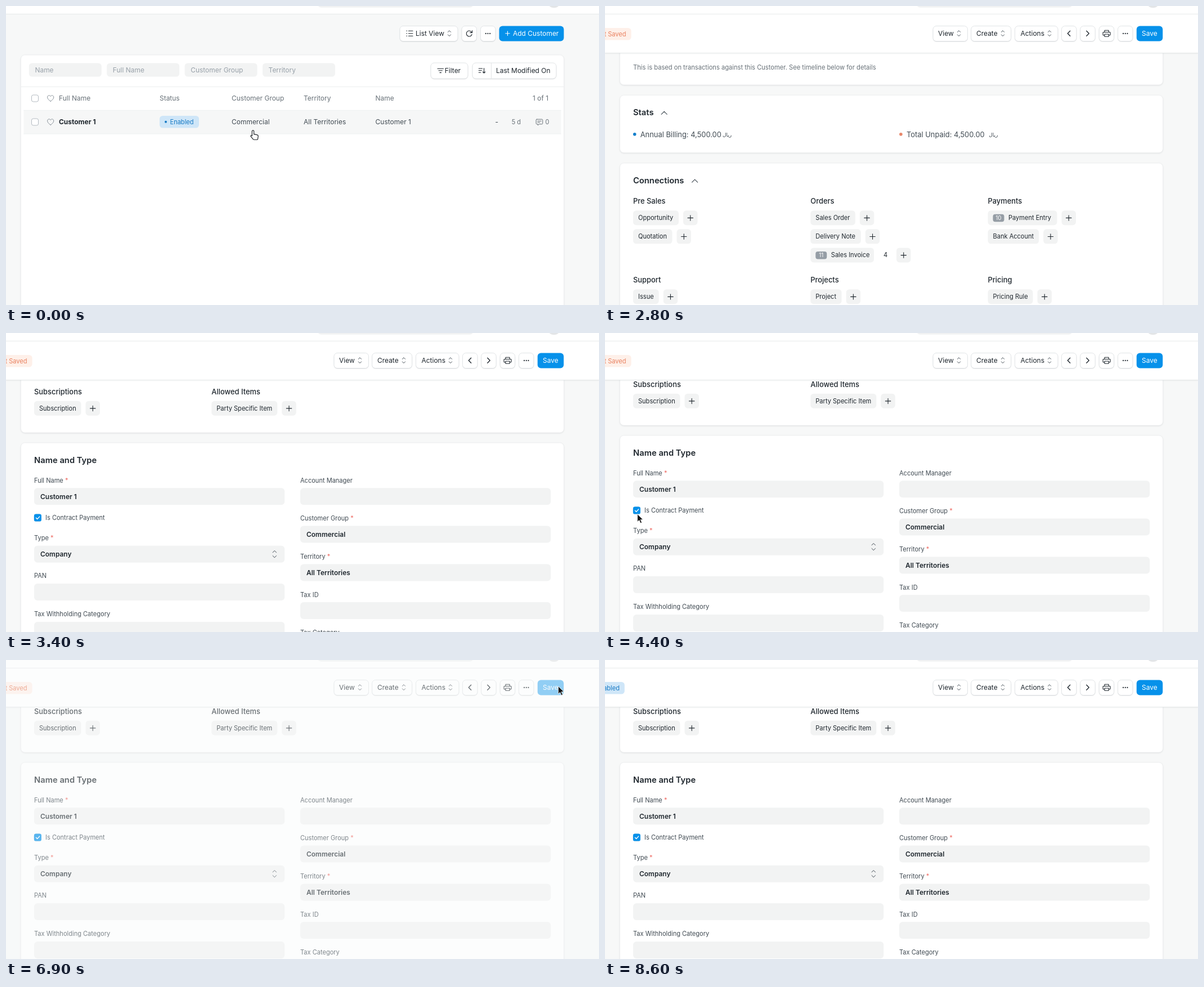
Animation of 1054x531 px, one loop 9100 ms. Source, as an HTML page:

```html
<!DOCTYPE html>
<html lang="en">
<head>
<meta charset="utf-8">
<title>Customer form</title>
<style>
html, body { margin: 0; width: 100%; height: 100%; overflow: hidden; background: #f7f8f8; }
svg { display: block; width: 1054px; height: 531px; }
text { font-family: Inter, sans-serif; white-space: pre; }
.chart text { font-family: "Open Sans", "Noto Sans", sans-serif; }
.rial { font-family: "DejaVu Sans", sans-serif; }
.card { filter: drop-shadow(0 1px 1.2px rgba(25, 39, 52, .1)); }
.btn { filter: drop-shadow(0 1px .6px rgba(25, 39, 52, .1)); }
</style>
</head>
<body>
<svg id="stage" viewBox="0 0 1054 531" xmlns="http://www.w3.org/2000/svg"></svg>
<script>
const LOOP = 9100, END_SCROLL = 782;
const INK = '#1f272e', LABEL = '#414b53', MUTED = '#687178', BLUE = '#0691ea', FIELD = '#f2f3f3', BG = '#f7f8f8';
const XS = 11.06, SM = 11.98, MD = 12.9, LG = 14.75;

const rect = (x, y, w, h, r, fill, extra = '') =>
  `<rect x="${x}" y="${y}" width="${w}" height="${h}" rx="${r}" fill="${fill}" ${extra}/>`;
// y is the middle of the capitals
const text = (x, y, s, size = SM, fill = INK, weight = 400, extra = '') =>
  `<text x="${x}" y="${(y + size * .364).toFixed(2)}" font-size="${size}" fill="${fill}" font-weight="${weight}" ${extra}>${s}</text>`;
const line = (d, color = INK, w = 1.1, extra = '') =>
  `<path d="${d}" fill="none" stroke="${color}" stroke-width="${w}" stroke-linecap="round" stroke-linejoin="round" ${extra}/>`;
const dot = (x, y, r, fill) => `<circle cx="${x}" cy="${y}" r="${r}" fill="${fill}"/>`;
const group = (id, body, extra = '') => `<g id="${id}" ${extra}>${body}</g>`;

const card = (y, h) => rect(26.5, y, 965, h, 7, '#fff', 'class="card" stroke="#eceeef" stroke-width=".8"');
const button = (x, w, y = 35.5, h = 27) => rect(x, y, w, h, 6, '#fff', 'class="btn" stroke="#e1e4e6"');
const upDown = (x, y, k = 1) =>
  line(`M${x - 2.6 * k} ${y - 2.3 * k}l${2.6 * k} ${-2.6 * k}l${2.6 * k} ${2.6 * k}M${x - 2.6 * k} ${y + 2.3 * k}l${2.6 * k} ${2.6 * k}l${2.6 * k} ${-2.6 * k}`, LABEL, 1);
const plus = (x, y, r, color = INK) => line(`M${x - r} ${y}h${2 * r}M${x} ${y - r}v${2 * r}`, color, 1.1);
const dots = x => [-3.7, 0, 3.7].map(d => dot(x + d, 48.9, 1.1, INK)).join('');
const box = (x, y) => rect(x, y, 12, 12, 3, '#fff', 'stroke="#b4bbc2"');
const heart = (x, y) =>
  line(`M${x} ${y + 5.2}c-3.4-2.4-5.6-4.6-5.6-7.2c0-3.4 4.2-4.4 5.6-1.4c1.4-3 5.6-2 5.6 1.4c0 2.6-2.2 4.8-5.6 7.2z`, '#8b949c', 1);

function listView() {
  let s = button(700, 103) + [44.3, 48.8, 53.3].map(y => dot(712.3, y, .8, INK) + line(`M715.5 ${y}h7.5`)).join('')
    + text(728, 48.5, 'List View') + upDown(788, 48.6);
  s += button(810, 26.5) + line('M828 47.2a5 5 0 1 0 .2 3M828.6 43.6v3.8h-3.8');
  s += button(843.5, 26.5) + dots(856.5);
  s += rect(876.5, 35.5, 115, 27, 6, BLUE) + plus(891.5, 48.7, 3.8, '#fff') + text(901, 48.5, 'Add Customer', SM, '#fff');
  s += card(87, 470);
  ['Name', 'Full Name', 'Customer Group', 'Territory'].forEach((n, i) => {
    const x = 40.8 + 138.4 * i;
    s += rect(x, 101.5, 129, 24, 5.5, FIELD) + text(x + 10.6, 113.6, n, SM, '#98a1a9');
  });
  s += button(755, 66, 101, 28) + line('M767 111.2h10.5M769 114.8h6.5M771 118.4h2.5') + text(779.8, 115, 'Filter');
  s += button(829, 149, 101, 28) + line('M862.5 101.5v27', '#e1e4e6', 1)
    + line('M840.3 111h6.5M840.3 114.5h5M840.3 118h3.5M849.6 110.5v8.6M847.4 117l2.2 2.2l2.2-2.2') + text(871, 115, 'Last Modified On');
  s += line('M27 143.5h964', '#eceeef', 1);
  s += rect(31.5, 185, 955, 42, 0, '#f6f7f7') + line('M31.5 185.3h955M31.5 227.2h955', '#edeff0', .8);
  [164, 206].forEach(y => s += box(45.5, y - 6) + heart(79.2, y));
  [[94, 'Full Name'], [273, 'Status'], [401, 'Customer Group'], [529, 'Territory'], [656.6, 'Name'], [936, '1 of 1']]
    .forEach(([x, n]) => s += text(x, 163.7, n, SM, MUTED));
  s += text(94, 205.4, 'Customer 1', SM, INK, 700);
  s += rect(273, 195, 70, 21.5, 5.5, '#cfe6f8') + dot(284, 205.8, 2, '#1579c4') + text(291.5, 205.8, 'Enabled', XS, '#1579c4');
  [[401, 'Commercial'], [529, 'All Territories'], [656.6, 'Customer 1']].forEach(([x, n]) => s += text(x, 206, n, SM, LABEL));
  s += text(869.5, 206, '-', SM, LABEL) + text(898.7, 206, '5 d', XS, MUTED) + text(958.5, 205.8, '0', XS, MUTED);
  s += line('M943.5 201.2h9a1.3 1.3 0 0 1 1.3 1.3v6a1.3 1.3 0 0 1-1.3 1.3h-5l-2.2 2.2v-2.2h-1.8a1.3 1.3 0 0 1-1.3-1.3v-6a1.3 1.3 0 0 1 1.3-1.3zM944.8 204.3h6.5M944.8 206.8h4.2', MUTED, 1);
  return s;
}

function heatmap() {
  const x0 = 159, y0 = 186.7, pitch = 11.07, day = 864e5;
  const start = Date.UTC(2021, 0, 27), end = Date.UTC(2022, 0, 27);
  const names = 'JAN FEB MAR APR MAY JUN JUL AUG SEP OCT NOV DEC'.split(' ');
  let s = '', col = 0;
  for (let t = start; t <= end; t += day) {
    const d = new Date(t), row = d.getUTCDay(), first = d.getUTCDate() === 1;
    if (row === 0) col++;
    if (first) col++;
    if (first || t === start) s += text(x0 + (col + 1) * pitch, 177.8, names[d.getUTCMonth()], 8.3, INK);
    const ago = (end - t) / day;
    const fill = ago === 6 ? '#c4e18d' : ago === 5 ? '#11602a' : '#e9ecef';
    s += rect((x0 + col * pitch).toFixed(2), (y0 + row * pitch).toFixed(2), 9.3, 9.3, 2.2, fill);
  }
  ['Mon', 'Wed', 'Fri'].forEach((n, i) => s += text(153.3, 202.8 + i * 22.1, n, 9.2, INK, 400, 'text-anchor="end"'));
  return `<g class="chart">${s}</g>`;
}

function heading(y, s, chevron) {
  return text(50, y, s, LG, INK, 600) + (chevron ? line(`M${chevron - 5} ${y + 4}l5-5l5 5`, LABEL, 1.1) : '');
}

function stat(x, color, label) {
  return dot(x + 2.7, 441.7, 2.8, color) + text(x + 12.7, 442.2, label + ': 4,500.00', MD, LABEL)
    + text(x + 159, 442.8, 'ریال', 9, LABEL, 400, 'class="rial"');
}

function links(x, y, title, items) {
  let s = text(x, y, title, MD, INK, 500);
  items.forEach(([name, w, badge, open], i) => {
    const cy = y + 29.7 + 33.1 * i, px = x + w + (open ? 40 : 8);
    s += rect(x, cy - 13, w, 26, 5.5, FIELD);
    if (badge) s += rect(x + 9, cy - 6.5, 20, 13.5, 4, '#959da5') + text(x + 19, cy + .2, badge, 10, '#fff', 400, 'text-anchor="middle"');
    s += text(x + (badge ? 36.5 : 9), cy, name, XS, INK);
    if (open) s += text(x + w + 17, cy, open, XS, INK);
    s += rect(px, cy - 13, 25.5, 26, 5.5, FIELD) + plus(px + 12.75, cy + .2, 4.7);
  });
  return s;
}

function field(x, y, label, value = '', required) {
  const star = required ? '<tspan fill="#ee6a62"> *</tspan>' : '';
  return text(x, y, label + star, XS, LABEL) + rect(x, y + 13.6, 445.3, 30, 6, FIELD)
    + (value && text(x + 11, y + 28.6, value, SM, INK, 600));
}

function formBody() {
  let s = card(87, 267) + heading(117.3, 'Overview', 136.7) + heatmap()
    + text(50, 322.5, 'This is based on transactions against this Customer. See timeline below for details', 11.15, MUTED);
  s += card(372.5, 102) + heading(402.3, 'Stats', 105.2)
    + stat(50, '#1580cc', 'Annual Billing') + stat(523.2, '#e8876a', 'Total Unpaid');
  s += card(493, 453) + heading(523.2, 'Connections', 159.6);
  const cols = [50, 365.3, 680.5];
  s += links(cols[0], 560.5, 'Pre Sales', [['Opportunity', 81], ['Quotation', 69.5]])
    + links(cols[1], 560.5, 'Orders', [['Sales Order', 79.5], ['Delivery Note', 89.5], ['Sales Invoice', 112.7, 11, 4]])
    + links(cols[2], 560.5, 'Payments', [['Payment Entry', 123, 10], ['Bank Account', 90.7]])
    + links(cols[0], 700.5, 'Support', [['Issue', 45.7], ['Maintenance Visit', 111], ['Installation Note', 103], ['Warranty Claim', 99]])
    + links(cols[1], 700.5, 'Projects', [['Project', 55.3]])
    + links(cols[2], 700.5, 'Pricing', [['Pricing Rule', 80]])
    + links(cols[0], 873, 'Subscriptions', [['Subscription', 83.5]])
    + links(cols[1], 873, 'Allowed Items', [['Party Specific Item', 117]]);
  s += card(964, 500) + heading(994.3, 'Name and Type');
  const l = 50, r = 523;
  s += field(l, 1030.6, 'Full Name', 'Customer 1', true) + field(l, 1133.2, 'Type', 'Company', true) + upDown(477.3, 1161.7, 1.25)
    + field(l, 1200.4, 'PAN') + field(l, 1268.4, 'Tax Withholding Category');
  s += field(r, 1030.6, 'Account Manager') + field(r, 1098, 'Customer Group', 'Commercial', true)
    + field(r, 1166, 'Territory', 'All Territories', true) + field(r, 1233.5, 'Tax ID') + field(r, 1301.3, 'Tax Category');
  s += rect(49, 1089.8, 14.6, 14.6, 4, 'none', 'id="ring" stroke="#9fd4f6" stroke-width="1.8"') + box(50.3, 1091.1)
    + group('tick', rect(49.9, 1090.6, 13, 13, 3.2, BLUE) + line('M53.4 1097.3l2.2 2.2l4-4.4', '#fff', 1.4))
    + text(70, 1097.2, 'Is Contract Payment', XS, LABEL);
  return s;
}

function formHeader() {
  let s = group('bar', rect(0, 14, 1054, 69.3, 0, '#fff', 'class="card"') + line('M0 83.4h1054', '#e6e9ea', .8));
  s += group('unsaved', rect(-60, 39, 106.6, 21.5, 5.5, '#fef0e9') + text(37.5, 49.6, 'Not Saved', XS, '#e9805f', 400, 'text-anchor="end"'));
  s += group('enabled', rect(-60, 39, 94.8, 21.5, 5.5, '#cfe6f8') + text(26, 49.6, 'Enabled', XS, '#1579c4', 400, 'text-anchor="end"'));
  [[583, 61.5, 'View', 592, 629], [650.7, 71, 'Create', 660, 707], [728.5, 76.5, 'Actions', 738.5, 790]]
    .forEach(([x, w, n, tx, ix]) => s += button(x, w) + text(tx, 48.5, n) + upDown(ix, 48.6));
  [811.5, 844.7, 878.2, 911.5].forEach(x => s += button(x, 26.5));
  s += line('M826.7 44.3l-4.4 4.5l4.4 4.5M855.8 44.3l4.4 4.5l-4.4 4.5', INK, 1.4) + dots(924.8);
  s += line('M888 46.5v-3.3h7.2v3.3M888 52h-2a.9.9 0 0 1-.9-.9v-3.7a.9.9 0 0 1 .9-.9h11.2a.9.9 0 0 1 .9.9v3.7a.9.9 0 0 1-.9.9h-2M888 50h7.2v4.3h-7.2z');
  return s + group('save', rect(944.8, 35.5, 46.5, 27, 6, BLUE) + text(954, 48.5, 'Save', SM, '#fff'));
}

const navbar = rect(0, 0, 1054, 14, 0, '#fff') + line('M0 14.3h1054', '#e4e7e8', .9)
  + rect(553.5, -24, 277.5, 26.8, 7, '#f1f2f3') + dot(974, -9, 12.2, '#e3e5e7');

const cursors =
  group('arrow', '<path d="M.6.6v13.8l3.2-2.9l2.3 5.2l2.4-1l-2.3-5.1h4.4z" fill="#141414" stroke="#fff" stroke-width=".8"/>')
  + group('hand', '<path d="M5 .9c1 0 1.6.7 1.6 1.6v5.2l5.2 1c1.8.3 2.6 1.3 2.4 2.9l-.7 4.5c-.1.9-.7 1.4-1.6 1.4H7.2c-.9 0-1.5-.3-2-1L1 11.4c-.6-1 .4-2 1.4-1.5l1 .6v-8c0-.9.6-1.6 1.6-1.6z" fill="#fff" stroke="#24282c" stroke-width="1.2"/>')
  + group('beam', ['#fff', '#222'].map((c, i) => line('M-2.8-8q2.8 0 2.8 1.5q0-1.5 2.8-1.5M0-6.5v13M-2.8 8q2.8 0 2.8-1.5q0 1.5 2.8 1.5M-1.5 2.5h3', c, i ? 1.2 : 2.6)).join(''));

const stage = document.getElementById('stage');
stage.innerHTML = rect(0, 0, 1054, 531, 0, BG) + group('list', listView())
  + group('form', group('body', formBody()) + formHeader()) + navbar
  + rect(0, 0, 1054, 531, 0, BG, 'id="veil"') + cursors;
const el = {};
stage.querySelectorAll('[id]').forEach(n => el[n.id] = n);

// time in tenths of a second, shape, position
const moves = [
  [0, 'hand', 434, 220], [1, 'hand', 352, 214], [2, 'hand', 287, 211], [4, 'hand', 225, 205], [5, 'hand', 160, 200],
  [6, 'hand', 112, 198], [7, 'hand', 95, 199], [14, 'arrow', 103, 200], [15, 'beam', 139, 204], [16, 'arrow', 108, 262],
  [17, 'arrow', 70, 335], [18, 'arrow', 34, 420], [19, 'arrow', 8, 495], [20, ''],
  [39, 'arrow', 206, 259], [40, 'arrow', 186, 290], [41, 'arrow', 148, 317], [42, 'arrow', 105, 331], [43, 'arrow', 74, 328],
  [44, 'arrow', 57, 321], [45, 'arrow', 54, 314], [57, 'arrow', 50, 306], [59, 'arrow', 746, 156.5], [61, 'arrow', 883, 90],
  [63, 'arrow', 930, 66], [64, 'hand', 976, 46], [68, 'arrow', 981, 46], [75, 'arrow', 840, 36], [76, 'arrow', 687, 27], [77, '']
];
const scrolls = [214, 372, 510, 618, 696, 744, 769, END_SCROLL];
const show = (n, on) => n.setAttribute('display', on ? 'inline' : 'none');

function veilAt(k) {
  if (k < 68 || k >= 79) return 0;
  if (k < 70) return (k - 67) * .17;
  return k < 77 ? .5 : (79 - k) * .17;
}

function draw(ms) {
  const k = Math.floor(ms / 100);
  const scroll = k < 28 ? 0 : scrolls[Math.min(k - 28, scrolls.length - 1)];
  show(el.list, k < 14);
  show(el.form, k >= 14);
  show(el.bar, scroll > 0);
  el.body.setAttribute('transform', `translate(0 ${-scroll})`);
  show(el.unsaved, k < 77);
  show(el.enabled, k >= 77);
  show(el.tick, k < 49 || k >= 55);
  show(el.ring, k >= 49 && k < 68);
  el.save.setAttribute('opacity', k >= 68 && k < 78 ? .65 : 1);
  el.veil.setAttribute('opacity', veilAt(k));
  const [, kind, x, y] = moves.filter(m => m[0] <= k).pop();
  for (const c of ['arrow', 'hand', 'beam']) show(el[c], c === kind);
  if (kind) el[kind].setAttribute('transform', `translate(${x} ${y})`);
}

const t0 = performance.now();
function tick() {
  draw((performance.now() - t0) % LOOP);
  requestAnimationFrame(tick);
}
tick();
</script>
</body>
</html>
```
